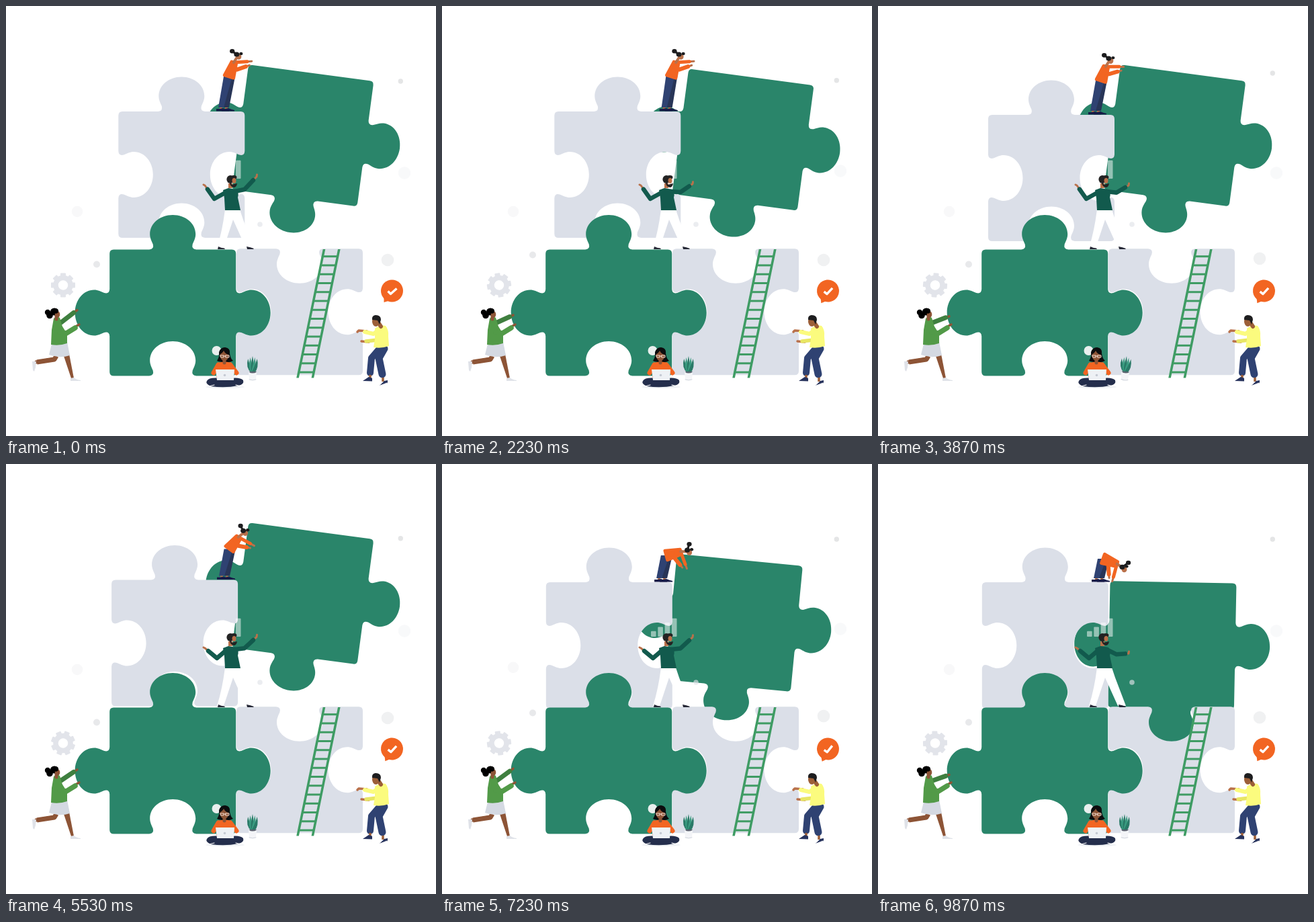
An HTML page with a canvas for the animation above (9.93 s loop, 640 by 640 pixels).

```html
<!DOCTYPE html>
<html lang="en">
<head>
<meta charset="utf-8">
<title>Puzzle teamwork</title>
<style>
  html, body { margin: 0; width: 100%; height: 100%; overflow: hidden; background: #fff; }
  canvas { display: block; width: 640px; height: 640px; }
</style>
</head>
<body>
<canvas id="stage" width="640" height="640"></canvas>
<script>
const ctx = document.getElementById('stage').getContext('2d');
const LOOP = 9930;
const GREEN = '#2a856a', GRAY = '#dbdfe8', ORANGE = '#f26522', NAVY = '#2f4272', INK = '#1d1d1f';
const SWEATER = '#125a4d', TAN = '#b9714b', BROWN = '#8d5436', LEAF = '#529a48', YELLOW = '#fbfb7e';

// Timing: linear ramp, eased ramp, and an eased trip there and back.
const ramp = (t, from, to) => Math.min(1, Math.max(0, (t - from) / (to - from)));
const smooth = (t, from, to) => { const p = ramp(t, from, to); return p * p * (3 - 2 * p); };
const hump = (t, from, to) => Math.sin(Math.PI * ramp(t, from, to)) ** 2;
const sway = t => -Math.cos(2 * Math.PI * t / 6600);

// Point at a distance from [x, y]; degrees run clockwise from straight up.
function polar([x, y], length, degrees) {
  const a = degrees * Math.PI / 180;
  return [x + length * Math.sin(a), y - length * Math.cos(a)];
}
const mix = ([ax, ay], [bx, by], p) => [ax + (bx - ax) * p, ay + (by - ay) * p];
const poly = (...points) => 'M' + points.join('L');

const fill = (color, d) => { ctx.fillStyle = color; ctx.fill(new Path2D(d)); };
function line(color, width, d, cap = 'round') {
  ctx.strokeStyle = color;
  ctx.lineWidth = width;
  ctx.lineCap = cap;
  ctx.lineJoin = 'round';
  ctx.stroke(new Path2D(d));
}
function oval(color, x, y, rx, ry = rx) {
  ctx.fillStyle = color;
  ctx.beginPath();
  ctx.ellipse(x, y, rx, ry, 0, 0, 7);
  ctx.fill();
}
function placed(x, y, degrees, draw) {
  ctx.save();
  ctx.translate(x, y);
  ctx.rotate(degrees * Math.PI / 180);
  draw();
  ctx.restore();
}

// Sides run top, right, bottom, left: 1 is a knob, -1 a socket, 0 flat.
function piece(color, x, y, degrees, sides) {
  placed(x, y, degrees, () => {
    ctx.beginPath();
    for (const s of sides) {
      const h = v => -94 - s * v;
      ctx.lineTo(-88, -94);
      if (s) {
        ctx.lineTo(-35, -94);
        ctx.quadraticCurveTo(-27.5, h(0.5), -29.5, h(8));
        ctx.bezierCurveTo(-31.5, h(13), -34, h(17), -34, h(23));
        ctx.bezierCurveTo(-34, h(39), -19, h(51.5), 0, h(51.5));
        ctx.bezierCurveTo(19, h(51.5), 34, h(39), 34, h(23));
        ctx.bezierCurveTo(34, h(17), 31.5, h(13), 29.5, h(8));
        ctx.quadraticCurveTo(27.5, h(0.5), 35, -94);
      }
      ctx.lineTo(88, -94);
      ctx.quadraticCurveTo(94, -94, 94, -88);
      ctx.rotate(Math.PI / 2);
    }
    ctx.closePath();
    ctx.fillStyle = color;
    ctx.fill();
  });
}

function loosePiece(t) {
  const push = 8.7 * hump(t, 0, 3280), fall = smooth(t, 5600, 8600);
  const x = 441.8 + push - 4.1 * fall - 5.3 * Math.sin(Math.PI * fall);
  piece(GREEN, x, 192.8 + push + 77 * fall, 7.6 - 6.5 * fall * fall, [0, 1, 1, 1]);
}

const grayDrop = t => smooth(t, 2430, 6700);

// Her whole pose follows from the push, the sinking floor and how far she bends.
function climber(t) {
  const push = hump(t, 0, 3280), drop = grayDrop(t), bend = ramp(t, 4700, 8800);
  const lean = 18 + 92 * bend;
  const foot = [322 + 15 * push + 5 * bend, 154 + 19 * drop];
  const hip = [foot[0] + 10 - 2 * push - 2 * bend, foot[1] - 49 + 4 * drop + 13 * bend];
  const shoulder = polar(hip, 22, lean);
  const head = polar(shoulder, 12, lean + 15);
  const bun = polar(head, 11, lean - 70);
  const reach = lean + 68 + 17 * drop;
  const farHand = polar(shoulder, 27, reach), nearHand = polar(shoulder, 24, reach + 14);
  const [hx, hy] = head, [fx, fy] = foot, [px, py] = hip;

  for (const [dx, color] of [[6, '#283557'], [-2, NAVY]]) {
    const ankle = fx + dx;
    fill(color, `M${px + dx / 2 - 7} ${py}h13L${ankle + 4} ${fy - 3}h-8z`);
    line(TAN, 4, `M${ankle} ${fy - 3}v2`, 'butt');
    fill('#171b48', `M${ankle - 7} ${fy - 1}h5l5 -1q4 2 9 3v1.5h-19z`);
  }
  const torso = poly(polar(hip, 7, lean - 90), polar(shoulder, 3, lean - 90),
    polar(shoulder, 4, lean + 90), polar(hip, 7, lean + 90)) + 'Z';
  const elbow = polar(mix(hip, shoulder, .6), 8, reach + 20);
  line(TAN, 3, poly(shoulder, farHand));
  line(ORANGE, 5, poly(shoulder, mix(shoulder, farHand, .75)));
  fill(ORANGE, torso);
  line(ORANGE, 5, torso);
  line(TAN, 3, poly(elbow, nearHand));
  line(ORANGE, 6, poly(mix(hip, shoulder, .7), elbow, mix(elbow, nearHand, .7)));

  line(TAN, 4, poly(head, shoulder));
  oval(TAN, hx + 1, hy + 1.5, 4, 4.3);
  oval(INK, hx - 2, hy - 2, 4, 3.6);
  oval(INK, hx + 4.5, hy - 3, 2.6, 2.2);
  line(INK, 3, poly([hx - 2, hy - 2], bun));
  oval(INK, ...bun, 3.6, 3.3);
}

function chart() {
  ctx.fillStyle = 'rgba(255,255,255,.5)';
  for (let i = 0; i < 4; i++) {
    const h = 8.3 + 6.3 * i;
    ctx.beginPath();
    ctx.roundRect(311 + 10.3 * i, 257 - h, 7.6, h, 1);
    ctx.fill();
  }
  oval('rgba(225,228,232,.65)', 378, 325, 3.8);
}

function bearded(t) {
  const rightY = 261 + 7 * sway(t) + 14 * smooth(t, 6600, 8900);
  const lower = smooth(t, 4000, 5500), leftY = 267 + 7 * lower;
  const right = [373, rightY], rightElbow = [355, 273 + (rightY - 254) * .37];
  const left = [296, leftY], leftElbow = [310 + 4 * lower, 287 + 2 * lower];
  fill('#fff', 'M326 303L348 303 353 318 369 360H357L338 318 324 360H314Q322 335 326 303Z');
  fill('#252735', 'M316 358q4 2 9 2.5l1 1.5h-11zM358 358q6 1 11 3l-1 1h-9z');
  line(TAN, 3, poly(rightElbow, right) + 'l.5 -3');
  line(SWEATER, 6.5, poly([340, 276], rightElbow, mix(rightElbow, right, .72)));
  line(TAN, 3, poly(leftElbow, left) + 'l-2 -1');
  line(SWEATER, 6.5, poly([328, 277], leftElbow, mix(leftElbow, left, .72)));
  fill(SWEATER, 'M323 274L331 271 343 273Q347 278 345 285L349 304H326L325 286Z');
  line(TAN, 6, 'M334 264V271', 'butt');
  oval('#232323', 334, 258, 5.6, 6);
  oval('#232323', 339, 255, 4.5, 3);
  oval(TAN, 339.5, 260, 3, 4);
  fill('#232323', 'M334 260L336 266 344 264Q343 270 339 270 334 269 333 264Z');
}

function ladder() {
  const color = '#3f9c64', railX = y => 473.5 - (y - 362) * .206;
  for (const dx of [0, 22.3])
    fill(color, `M${471.7 + dx} 362h3.6L${railX(553.5) + dx + 1.8} 553.5h-3.6z`);
  for (let y = 372.7; y < 550; y += 13.26) line(color, 3, `M${railX(y)} ${y}h22.3`, 'butt');
}

function runner(t) {
  const hand = [106, 457.5 + 5 * sway(t)], shoulder = [82, 471];
  line(BROWN, 7, 'M75 521L72 526 46 530', 'butt');
  line(BROWN, 5, 'M68 526L45 530');
  fill('#dfe2e8', 'M39 529L45 529 44 538 42 544 40 542Z');
  fill(BROWN, 'M85 518H94L101 554H97Z');
  fill('#dfe2e8', 'M96 554L101 553Q104 556 111 557V558H96Z');
  line(BROWN, 3.5, poly(shoulder, hand));
  line('#3f7f3f', 7, poly(shoulder, mix(shoulder, hand, .78)));
  fill('#d4d9e2', 'M68 503L91 500 95 520Q80 525 64 519Z');
  fill(LEAF, 'M71 465Q76 461 80 464L84 477 91 488V502Q80 506 67 504L68 482Z');
  line(BROWN, 3.5, 'M102 478L109 474');
  line(LEAF, 7.5, 'M80 486L90 487 103 479');
  line(BROWN, 5, 'M75 461V466');
  oval('#000', 72, 455, 6, 5.5);
  oval(BROWN, 76.5, 459, 3.8, 5);
  oval('#000', 74, 454, 4, 3.8);
  oval('#000', 62, 456, 4.2);
  oval('#000', 65, 460.5, 4.8);
}

function pusher() {
  const skin = '#9c5f38';
  line(NAVY, 10, 'M556 510L544 524 542 546');
  line(NAVY, 11, 'M563 510L555 524 560 548');
  line(skin, 3.5, 'M542 549V555M561 553V559', 'butt');
  fill('#26325c', 'M531 558L540 552 545 554V559ZM556 565L563 558 568 557V561Z');
  line('#fff', 1, 'M533 559H545M557 565L567 561');
  line(TAN, 3.5, 'M537 484L525 483 523 485M540 500L529 499');
  line('#e8e664', 5.5, 'M553 497L536 499');
  line(YELLOW, 6, 'M557 480L547 488 534 485');
  fill(YELLOW, 'M549 480Q557 474 565 476 570 482 569 492L570 506Q559 510 547 508L549 496Z');
  line(skin, 6, 'M554 471L558 477');
  oval(skin, 550.5, 469.5, 5.5, 7.5);
  fill(INK, 'M545 467Q544 461 550 460 558 460 558 467L556 474 553 468Z');
}

function sitter() {
  oval('#eef1f4', 326, 567, 29, 2);
  oval('#e9efee', 313.5, 513, 7);
  fill('#0c0c0e', 'M314 528Q318 522 317 516 319 508 326 508 334 509 333 517 334 525 338 528 333 531 325 530 318 530 314 528Z');
  line(ORANGE, 7, 'M316 534L309 546M334 534L343 546');
  fill(ORANGE, 'M315 531Q325 528 336 531L338 553H313Z');
  line(BROWN, 5, 'M325 524V531');
  oval(BROWN, 325, 520, 6.5, 8);
  fill('#0c0c0e', 'M317 519Q317 508 326 509 334 509 333 519 327 519 324 513 322 517 317 519Z');
  line('#f3d9cc', 1, 'M319 520h5v3h-4zM327 520h5v3h-5zM324 521h3');
  fill('#242e4c', 'M299 558Q303 551 326 555 348 551 353 557 355 563 346 565 326 569 305 566 296 562 299 558Z');
  line('#fff', 1.2, 'M302 566L310 564M350 566L342 564');
  fill('#eef1f5', 'M312 541H340L339 557H314Z');
  oval('#c5cad3', 325.5, 549.5, 1.8);
}

function plant(t) {
  placed(367, 556, 5 * hump(t, 2400, 5400), () => {
    for (let i = -2; i <= 2; i++) {
      const x = 3.4 * i, y = -35 + 2 * Math.abs(i);
      fill(i % 2 ? '#3a9c80' : '#2a7a67', `M-2 -10Q${x - 4} -18 ${x} ${y}Q${x + 3} -18 3 -10Z`);
    }
    fill('#59636f', 'M-5 -12H6L4 -9H-3Z');
    fill('#f4f5f8', 'M-6 -11Q0 -8 6 -11L5 0Q0 2 -5 0Z');
    line('#cfd4dc', 1, 'M-5 0Q0 2 5 0');
  });
}

function gear(t) {
  placed(85, 415.5, t / LOOP * 360, () => {
    ctx.strokeStyle = ctx.fillStyle = '#e2e4ea';
    ctx.lineWidth = 7.5;
    ctx.beginPath();
    ctx.arc(0, 0, 11, 0, 7);
    ctx.stroke();
    for (let i = 0; i < 8; i++) {
      ctx.beginPath();
      ctx.roundRect(-4, -18, 8, 6, 1);
      ctx.fill();
      ctx.rotate(Math.PI / 4);
    }
  });
}

function badge(t) {
  placed(574.5, 424, -6 * smooth(t, 0, 900) - 4 * hump(t, 5800, 8700), () => {
    oval(ORANGE, 0, 0, 16.5);
    fill(ORANGE, 'M-12 8V17L-2 14Z');
    line('#fff', 3.4, 'M-6 .5L-2 4.5 7 -3.5', 'butt');
  });
}

function dots(t) {
  const hop = (period, peak, height) => height * Math.cos(Math.PI * (t - peak) / period) ** 16;
  oval('#f8f8f9', 106, 306 - hop(1986, 1000, 15), 8.3);
  oval('#e8e9eb', 135, 384.5 - hop(4965, 2230, 14), 5);
  oval('#e4e5e6', 587.3, 112 - hop(LOOP, 3870, 12), 3.7);
  oval('#f8f9fa', 593, 248.5 - hop(4965, 2230, 3), 9.3);
  oval('#f0f1f2', 568, 378 - hop(3100, 970, 3), 9.3);
}

function draw() {
  const t = performance.now() % LOOP, drop = grayDrop(t);
  ctx.fillStyle = '#fff';
  ctx.fillRect(0, 0, 640, 640);
  dots(t);
  gear(t);
  loosePiece(t);
  climber(t);
  piece(GRAY, 261.3 - 12.5 * drop, 251 + 19 * drop, 0, [1, -1, -1, -1]);
  piece(GRAY, 437, 455.2, 0, [-1, -1, 0, -1]);
  piece(GREEN, 248.2, 456.5, 0, [1, 1, -1, 1]);
  chart();
  bearded(t);
  ladder();
  runner(t);
  pusher();
  sitter();
  plant(t);
  badge(t);
  requestAnimationFrame(draw);
}
draw();
</script>
</body>
</html>
```
